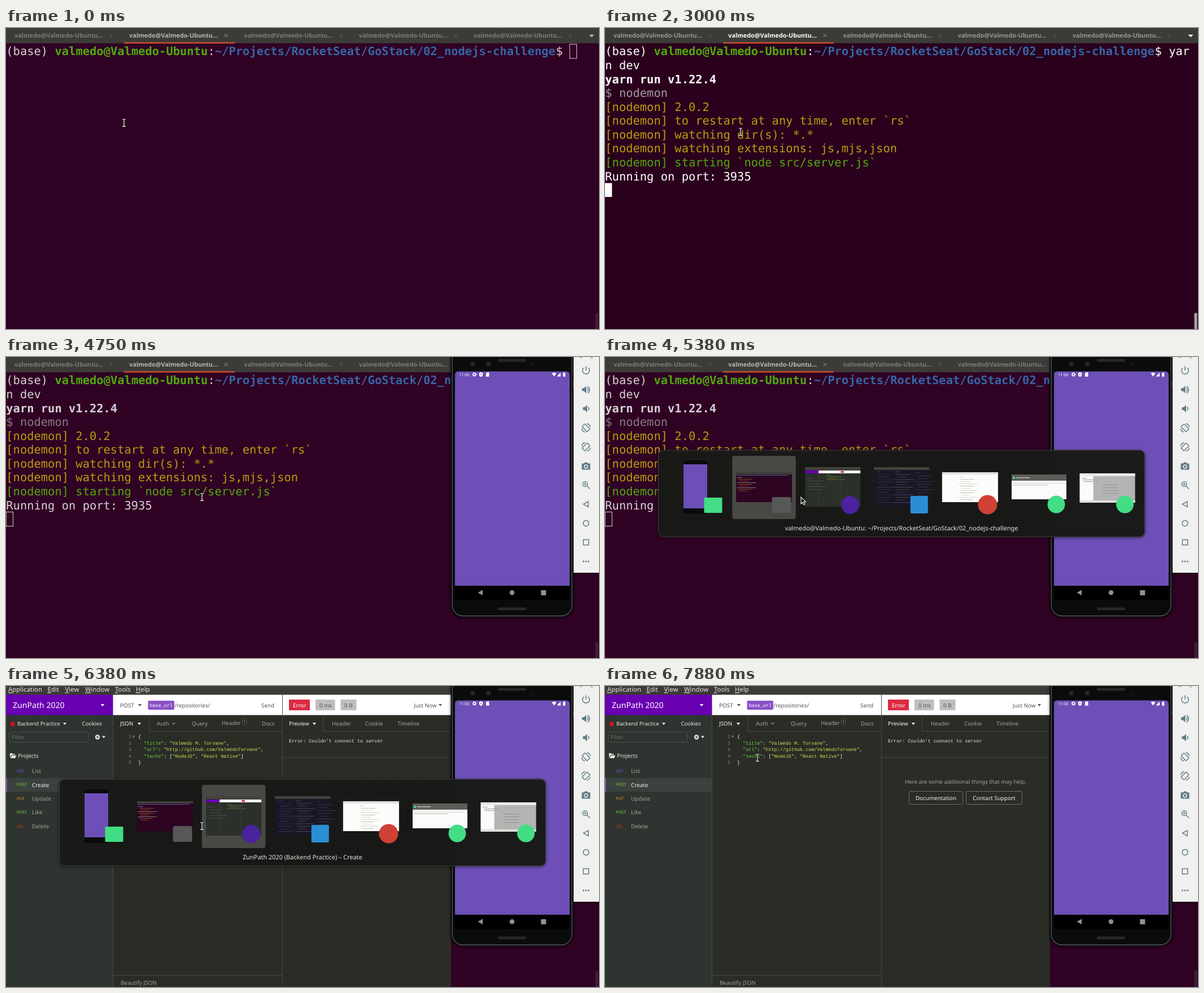
These frames come from a looping animation (1050 by 533 pixels, 8 s). An HTML page:

```html
<!DOCTYPE html>
<html lang="en">
<head>
<meta charset="utf-8">
<title>Terminal session</title>
<style>
html, body { margin: 0; width: 100%; height: 100%; overflow: hidden; background: #300224; }
svg { display: block; width: 1050px; height: 533px; --f: 0%; }
text { font-family: "Noto Sans", "Open Sans", sans-serif; white-space: pre; text-rendering: geometricPrecision; }
.term { font: 20.46px "DejaVu Sans Mono", monospace; }
.code { font: 8.42px "Liberation Mono", monospace; }
.b { font-weight: bold; }
.bg { fill: color-mix(in srgb, #300224, #2a011d var(--f)); }
.w { fill: color-mix(in srgb, #d6d1d4, #fff var(--f)); }
.dim { fill: color-mix(in srgb, #867c82, #a39ba0 var(--f)); }
.tab { fill: color-mix(in srgb, #7c7b77, #979590 var(--f)); }
.on { fill: color-mix(in srgb, #b9b7b2, #fff var(--f)); }
.thumb { fill: color-mix(in srgb, #421d38, #aaa3a7 var(--f)); }
.g { fill: #52a80f; }
.p { fill: #3765a6; }
.y { fill: #bc9c0c; }
.line { fill: none; stroke: #464a42; }
.icon { fill: none; stroke: #5f7b88; stroke-width: 1.5; }
.icon .s { fill: #5f7b88; stroke: none; }
.raised { filter: drop-shadow(0 1px 2.5px rgba(0, 0, 0, .6)); }
</style>
</head>
<body>
<svg id="stage" viewBox="0 0 1050 533"></svg>
<script>
const LOOP = 8000, CELL = 12.32, ROW = 24.57, TOP = 28.9;
const HOST = 'valmedo@Valmedo-Ubuntu';
const PATH = '~/Projects/RocketSeat/GoStack/02_nodejs-challenge';
const PROJECT = 'ZunPath 2020', SPACE = 'Backend Practice';

// Drawing helpers
const during = (from, to, body) => `<g data-t="${from} ${to}">${body}</g>`;
const rect = (x, y, w, h, fill, more = '') =>
  `<rect x="${x}" y="${y}" width="${w}" height="${h}" fill="${fill}" ${more}/>`;
const dot = (x, y, r, fill, more = '') => `<circle cx="${x}" cy="${y}" r="${r}" fill="${fill}" ${more}/>`;
const path = (d, more = '') => `<path d="${d}" ${more}/>`;
const label = (x, y, s, size, fill, more = '') =>
  `<text x="${x}" y="${y}" font-size="${size}" fill="${fill}" ${more}>${s}</text>`;
const arrow = (x, y, w, h, fill, more = '') =>
  path(`M${x - w / 2} ${y - h / 2}h${w}l${-w / 2} ${h}z`, `fill="${fill}" ${more}`);
const shift = (x, y, body) => `<g transform="translate(${x} ${y})">${body}</g>`;
const raised = body => `<g class="raised">${body}</g>`;

// Terminal
const print = (col, row, s, cls = 'w') =>
  `<text class="term ${cls}" x="${col * CELL + .3}" y="${TOP + row * ROW + 19.5}">${s}</text>`;
const block = (col, row) => rect(col * CELL, TOP + row * ROW, CELL, ROW, '#fff');
const hollow = (col, row) =>
  rect(col * CELL + .2, TOP + row * ROW - .2, CELL, ROW + .6, 'none', 'stroke="#d6d1d4"');

function terminal() {
  let s = '<rect class="bg" width="1050" height="533"/>' + rect(0, 0, 1050, 27, '#3c3b37');
  for (let i = 0; i < 5; i++) {
    const x = 15 + i * 203.25;
    s += `<text class="b ${i == 1 ? 'on' : 'tab'}" x="${x}" y="17" font-size="10.8">${HOST}...</text>`;
    s += path(`M${x + 168.5} 10.5l5.5 5.5m0-5.5l-5.5 5.5`, `stroke="${i == 1 ? '#a5a39e' : '#65645f'}"`);
  }
  s += rect(209, 25, 196, 2.6, '#c64d2c') + arrow(1037, 14, 9, 4.5, '', 'class="on"');
  s += '<rect class="thumb" x="1043.5" y="504.5" width="5" height="30" rx="2"/>';
  s += print(0, 0, '(base)') + print(7, 0, HOST, 'g b') + print(29, 0, ':') +
    print(30, 0, PATH, 'p b') + print(79, 0, '$');
  s += during(0, 630, hollow(81, 0)) + during(630, 1500, block(81, 0));
  s += during(1500, LOOP, print(81, 0, 'yar') + print(0, 1, 'n dev'));
  s += during(1500, 1750, block(5, 1)) + during(2000, 2380, block(0, 2));
  s += during(2380, LOOP, print(0, 2, 'yarn run v1.22.4', 'w b') + print(0, 3, '$ nodemon', 'dim'));
  const log = ['2.0.2', 'to restart at any time, enter `rs`', 'watching dir(s): *.*',
    'watching extensions: js,mjs,json', 'starting `node src/server.js`'];
  s += during(2630, LOOP, log.map((m, i) => print(0, 4 + i, '[nodemon] ' + m, i == 4 ? 'g' : 'y')).join(''));
  s += during(2880, LOOP, print(0, 9, 'Running on port: 3935'));
  return s + during(2880, 3380, block(0, 10)) + during(3380, LOOP, hollow(0, 10));
}

// REST client
const NOTE = '#a0a39c', PALE = '#e6e6e3', INK = '#555';

function codeLine(n, src, indent) {
  const parts = src.split(/("[^"]*")/);
  const spans = parts.map((p, i) => {
    const fill = i % 2 == 0 ? '#f0f0ea' : parts[i + 1][0] == ':' ? '#6fd84a' : '#d9dd55';
    return `<tspan fill="${fill}">${p}</tspan>`;
  }).join('');
  const y = 80.5 + n * 11.5;
  return label(217, y, n, 8.42, '#84877f', 'class="code"') +
    `<text class="code" x="${234 + indent * 10.1}" y="${y}">${spans}</text>`;
}

function client() {
  let s = rect(0, 0, 788, 533, '#2a2d26') + rect(0, 0, 190, 533, '#2e342f') + rect(0, 0, 788, 15.5, '#3c3b37');
  [['Application', 4], ['Edit', 73.5], ['View', 104.5], ['Window', 140], ['Tools', 193], ['Help', 230]]
    .forEach(([m, x]) => s += label(x, 10.3,
      `<tspan text-decoration="underline">${m[0]}</tspan>${m.slice(1)}`, 11.4, '#e9e8e4'));

  // Header row
  s += rect(0, 15.5, 189.5, 36, '#6900b1') + rect(189.5, 15.5, 598.5, 36, '#fff');
  s += label(12, 38.5, PROJECT, 14.1, '#fff') + arrow(171, 34, 7, 4, '#fff');
  s += label(202, 37.5, 'POST', 10, INK) + arrow(237, 34, 6.5, 4, INK);
  s += rect(251.5, 26, 46.5, 16, '#8a51c6', 'rx="2"') + label(254.5, 37, 'base_url', 8.42, '#fff', 'class="code"');
  s += label(298.5, 37.5, '/repositories/', 9.9, INK) + label(452, 37.5, 'Send', 9.9, INK);
  s += rect(501, 24, 37, 19, '#db2b42') + label(508, 37.5, 'Error', 10, '#fff');
  s += rect(548, 24, 34.5, 19, '#bebebe') + label(555, 37.5, '0 ms', 9.8, INK);
  s += rect(592.5, 24, 28, 19, '#bebebe') + label(599, 37.5, '0 B', 9.8, INK);
  s += label(722, 37.5, 'Just Now', 9.8, INK) + arrow(769, 34, 6, 4, INK);

  // Dividers and pane tabs
  s += path('M189.5 51V533M489.5 15V533M253.5 51V80.5H489M561.5 51V80.5H788M489 126.5H788M190 512.5H489', 'class="line"');
  [['JSON', 202, 1, 236], ['Auth', 267, 0, 297], ['Query', 329], ['Header', 382], ['Docs', 453],
    ['Preview', 501, 1, 546], ['Header', 577], ['Cookie', 636], ['Timeline', 693]].forEach(([t, x, on, tri]) => {
    const c = on ? '#f2f2ef' : NOTE;
    s += label(x, t == 'Header' && x < 400 ? 69.3 : 70, t, 9.8, c);
    if (tri) s += arrow(tri, 67, 6.5, 4, on ? c : '#70736c');
  });
  s += rect(418.5, 57.5, 8, 11, 'none', 'stroke="#4d5149" rx="1"') + label(420.3, 66, 1, 7.5, NOTE);

  // Sidebar
  s += dot(11.8, 67, 4, '#d31327') + label(20, 69.5, SPACE, 9.5, PALE) + arrow(104, 67, 6, 4, PALE);
  s += label(134.5, 69.5, 'Cookies', 9.6, PALE);
  s += rect(5.5, 81.5, 140, 18, 'none', 'stroke="#4c524c" rx="2"') + label(10, 94, 'Filter', 9.6, '#686d67');
  s += dot(162, 90.5, 4.2, PALE) + path('M159.5 90.5h5m-2.5-2.5v5', 'stroke="#2e342f"') + arrow(173, 90.5, 6, 4, PALE);
  s += path('M7 119h4l1 1.5h4v1.5h-6l-3 5z M10.5 123h8l-2.5 5h-8z', `fill="${PALE}"`) + label(21, 127, 'Projects', 9.8, PALE);
  s += rect(0, 163, 189, 24, '#3b413c') + rect(0, 163, 1.5, 24, '#9457d8');
  [['GET', 'List', '#7c48d2'], ['POST', 'Create', '#79d13c'], ['PUT', 'Update', '#cf9a1e'],
    ['POST', 'Like', '#79d13c'], ['DEL', 'Delete', '#c63d1c']].forEach(([m, name, c], i) => {
    const y = 150.3 + i * 24.4;
    s += label(19, y + 2.6, m, 7.4, c) + label(46, y + 3.8, name, 9.9, i == 1 ? '#f2f2ef' : NOTE);
  });

  // Request body
  s += ['{', '"title": "Valmedo M. Torvane",', '"url": "http://github.com/ValmedoTorvane",',
    '"techs": ["NodeJS", "React Native"]', '}']
    .map((c, i) => codeLine(i + 1, c, i % 4 ? 1 : 0)).join('');
  s += arrow(226, 90, 5, 4, '#6d7068') + label(203, 529, 'Beautify JSON', 9.8, NOTE);

  // Response
  const mid = 'text-anchor="middle"';
  s += label(501, 100, "Error: Couldn't connect to server", 8.42, '#e4e4de', 'class="code"');
  s += label(638.5, 172.5, 'Here are some additional things that may help.', 9.75, NOTE, mid);
  [['Documentation', 538.5, 95], ['Contact Support', 639.5, 99]].forEach(([t, x, w]) =>
    s += rect(x, 186.5, w, 23, 'none', 'stroke="#6b6e67" rx="2"') + label(x + w / 2, 201.7, t, 9.9, '#f2f2ef', mid));
  return s;
}

// Emulator
function phone() {
  let s = raised(rect(787.5, -40, 217, 501, '#08090a', 'rx="22"'));
  s += rect(790.3, -40, 211.8, 498.5, '#0a0b0b', 'rx="19" stroke="#585b5e" stroke-width="1.3"');
  s += rect(795, 380, 203, 50, '#000', 'rx="4"') + path('M795 405V31.5q0-6 6-6H992q6 0 6 6V405z', 'fill="#6d4fb7"');
  s += rect(871, 3.5, 50, 5, '#26282a', 'rx="2"') + rect(871, 443.5, 50, 5, '#26282a', 'rx="2"');
  [826, 854].forEach(x => s += dot(x, 12.5, 5, '#1b1d20') + dot(x, 12.5, 2, '#303338'));
  s += dot(932, 13, 3.5, '#111315');
  s += path('M844 412.5v9.5l-8.5-4.7z', 'fill="#929292"') + dot(896, 417.3, 4.2, '#929292') + rect(947.3, 413, 9, 9, '#929292');
  s += label(802, 34, '11:00', 7.2, '#fff');
  s += dot(829.5, 31, 2.2, 'none', 'stroke="#fff" stroke-width="1.6"') +
    dot(829.5, 31, 3.3, 'none', 'stroke="#fff" stroke-dasharray="1.3 1.3"');
  s += path('M841 27l3.2 1.2v3q0 2.6-3.2 4q-3.2-1.4-3.2-4v-3zM851.5 27.3h4v7.5h-5.5v-5.8z', 'fill="#fff"') + dot(841, 31, 1, '#6d4fb7');
  s += path('M966.5 29q4-3 8 0l-4 5.5zM982 27.5v7h-6.5zM986.3 28.2h1v-1h2v1h1v6.6h-4z', 'fill="#fff"');

  const speaker = '<path class="s" d="M-7-2.5h3l4.5-4V6.5l-4.5-4h-3z"/>';
  const turn = '<rect x="-3.6" y="-6.4" width="7.2" height="12.8" rx="1" transform="rotate(-45)"/>' +
    path('M1.5-7.5q5.5 1 6 6M-1.5 7.5q-5.5-1-6-6');
  const icons = [
    path('M-3.8-5A6.2 6.2 0 1 0 3.8-5M0-7.5V0'),
    speaker + path('M2.5-3q2.5 3 0 6M3-6.3q7 6.3 0 12.6'),
    shift(1.5, 0, speaker + path('M2.5-3q2.5 3 0 6')),
    turn, `<g transform="scale(-1 1)">${turn}</g>`,
    '<path class="s" d="M-7.5-4.5h4l1.5-2h4l1.5 2h4v11h-15z"/>' + dot(0, 1, 3, 'none', 'stroke="#f0f1ef"'),
    dot(-1.5, -1.5, 4.3, 'none') + path('M2 2l5 5M-3.5-1.5h4m-2-2v4'),
    path('M4-4.8V4.8L-4.5 0z'), dot(0, 0, 5, 'none'), rect(-4.7, -4.7, 9.4, 9.4, 'none'),
    [-4.5, 0, 4.5].map(x => `<circle class="s" cx="${x}" r="1.5"/>`).join('')
  ];
  s += raised(rect(1005, -5, 50, 387, '#f0f1ef')) + path('M1015 .8h6M1034.5-1.5l5 4.5m0-4.5l-5 4.5', 'stroke="#8a8d8c"');
  return s + '<g class="icon">' + icons.map((i, n) => shift(1027, 24 + n * 33.8, i)).join('') + '</g>';
}

// Window switcher: thumbnails are drawn around x = 0
const rows = (x, y, n, step, fills) => Array.from({ length: n }, (_, i) =>
  rect(x + i % 3 * 2, y + i * step, 9 + i * 17 % 26, 1, fills[i % fills.length])).join('');

const windows = {
  term: rect(-49.5, 204, 99, 53, '#2e0423') + rect(-49.5, 204, 99, 4, '#403e3a') + rect(-49, 209, 92, 1, '#4a6690') +
    rows(-48, 213, 9, 3, ['#8d7a85', '#7d5214', '#8c3a1c']) + rect(14, 248, 34, 28, '#565756', 'rx="3"'),
  client: rect(-49, 195, 98, 70, '#2b302a') + rect(-49, 195, 98, 5, '#44423e') + rect(-49, 201, 24, 5, '#6900b1') +
    rect(-25, 201, 74, 5, '#fff') + rect(14, 202, 6, 3, '#db2b42') + rows(-12, 209, 4, 2.5, ['#48652f', '#666834']) +
    rows(-45, 214, 5, 5, ['#464c45']) + path('M-25 206v59M13 206v59', 'stroke="#393e37"') + dot(31, 262, 16, '#4b22a0'),
  phone: rect(-22.5, 182, 45, 97, '#0a0b0c', 'rx="5" stroke="#222325"') + rect(-21, 190, 42, 78, '#6d4fb7') +
    rect(15.5, 249, 32, 27, '#42dd85', 'rx="1"'),
  editor: rect(-48.5, 195, 98, 70, '#1b1626') + rect(-48.5, 195, 98, 5, '#44423e') +
    rows(-44, 203, 13, 4.5, ['#35304a', '#2c293d']) + rows(-12, 203, 13, 4.5, ['#4a4262', '#3a5146', '#4d384b']) +
    rows(25, 205, 9, 5, ['#373149']) + rect(16, 246, 31, 31, '#2a8ed6', 'rx="2"'),
  browser: rect(-49.5, 204, 99, 53, '#fcfcfb') + rect(-49.5, 204, 99, 4, '#dedfe0') +
    rows(-20, 212, 11, 4, ['#d3d6d3', '#b4c5b5', '#dedcb4']) + dot(31, 261.5, 17, '#cf4035'),
  devices: rect(-48, 208, 97, 44, '#fbfbf9') + rect(-48, 208, 97, 11, '#5c5d59') + dot(-44, 214, 2.2, '#42dd85') +
    rect(-40, 213, 24, 1.5, '#bcbdb8') + rect(-46, 223, 90, 1, '#d2d2cf') + rect(-46, 226, 62, 1, '#b8b8b5') + dot(31, 261, 15.5, '#42dd85'),
  studio: rect(-49, 206, 98, 52, '#b4b4b2') + rect(-49, 206, 98, 5, '#e9e9e6') + rect(-49, 211, 24, 43, '#fafaf8') +
    rect(-49, 254, 98, 4, '#dededb') + rows(-46, 214, 3, 3, ['#999']) +
    [226, 231, 236, 241].map(y => rect(-8, y, 27, 1, '#92928f')).join('') + dot(31, 261, 15.5, '#42dd85')
};

function switcher(order, pick, title) {
  let s = raised(rect(94.5, 165, 861, 153.5, '#1a1b18', 'rx="9" fill-opacity=".96" stroke="#41423e"'));
  s += rect(225.3 + (pick - 1) * 121.6, 175, 112.5, 112, '#484845', 'rx="4"');
  s += [...order, 'editor', 'browser', 'devices', 'studio']
    .map((w, i) => shift(160 + i * 121.6, 0, windows[w])).join('');
  return s + label(525, 307, title, 10.9, '#e6e5e1', 'text-anchor="middle"');
}

const app = `${PROJECT} (${SPACE}) – Create`;
const stage = document.getElementById('stage');
const ibeam = 'M-3-6.5q2 0 3 1q1-1 3-1M0-5.5v11M-3 6.5q2 0 3-1q1 1 3 1';
stage.innerHTML = terminal() +
  during(6380, LOOP, client()) +
  during(4750, LOOP, phone()) +
  during(3630, 4750, switcher(['term', 'client', 'phone'], 1, app)) +
  during(5380, 6130, switcher(['phone', 'term', 'client'], 1, `${HOST}: ${PATH}`)) +
  during(6130, 6500, switcher(['phone', 'term', 'client'], 2, app)) +
  `<g id="ibeam" fill="none">${path(ibeam, 'stroke="#1a1a1a" stroke-width="3"')}${path(ibeam, 'stroke="#eee" stroke-width="1.2"')}</g>` +
  `<g id="arrow">${path('M0 0V12l2.8-2.5 2 4.3 2-1-2-4.2h3.8z', 'fill="#161616" stroke="#f2f2f2" stroke-width="1.1"')}</g>`;

// Pointer: time, shape, x, y
const moves = [
  [0, 'ibeam', 209, 168], [1130, ''],
  [2880, 'ibeam', 209, 168], [3000, 'ibeam', 240, 184], [3130, 'ibeam', 296, 216],
  [3250, 'ibeam', 350, 242], [3380, 'ibeam', 347, 248], [3630, 'arrow', 347, 248],
  [4750, 'ibeam', 347, 248], [5380, 'arrow', 347, 248], [6380, 'ibeam', 347, 248],
  [6880, 'ibeam', 440, 195], [7000, 'arrow', 535, 208], [7250, 'arrow', 508, 186],
  [7380, 'ibeam', 430, 140], [7500, 'ibeam', 352, 98], [7630, 'arrow', 300, 70],
  [7750, 'ibeam', 278, 98], [7880, 'ibeam', 270, 127]
];
const focus = [[0, '0%'], [630, '50%'], [750, '100%'], [4750, '0%']];
const latest = (steps, t) => steps.findLast(s => s[0] <= t);

const layers = [...stage.querySelectorAll('[data-t]')].map(el => [el, ...el.dataset.t.split(' ').map(Number)]);
const shapes = ['ibeam', 'arrow'].map(id => document.getElementById(id));

function draw(t) {
  for (const [el, from, to] of layers) el.style.display = t >= from && t < to ? '' : 'none';
  stage.style.setProperty('--f', latest(focus, t)[1]);
  const [, shape, x, y] = latest(moves, t);
  for (const el of shapes) {
    el.style.display = el.id == shape ? '' : 'none';
    if (el.id == shape) el.setAttribute('transform', `translate(${x} ${y})`);
  }
}

const start = performance.now();
function tick() {
  draw((performance.now() - start) % LOOP);
  requestAnimationFrame(tick);
}
draw(0);
requestAnimationFrame(tick);
</script>
</body>
</html>
```
